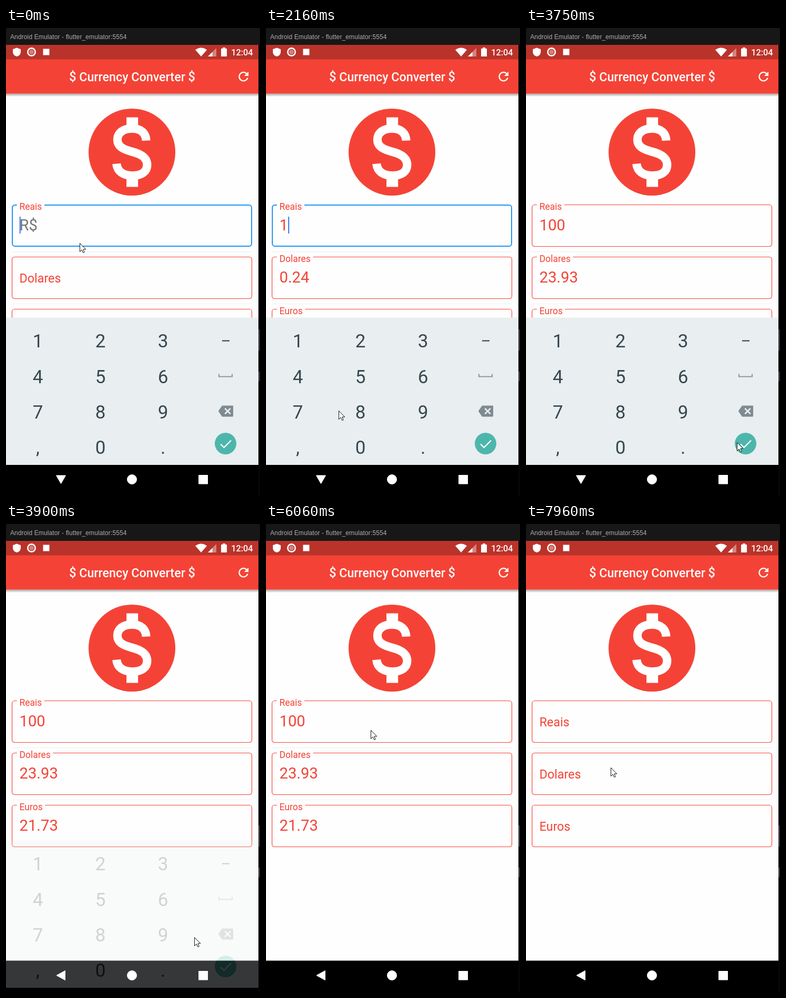
An HTML page for the animation above (8000 ms loop, 483 by 888 pixels).

```html
<!DOCTYPE html>
<html lang="en">
<head>
<meta charset="utf-8">
<title>Currency Converter</title>
<style>
html, body { margin: 0; width: 100%; height: 100%; overflow: hidden; background: #000; }
svg { display: block; width: 483px; height: 888px; font-family: Roboto, sans-serif; }
.window { font: 12px 'Liberation Sans', Arial, sans-serif; letter-spacing: .12px; fill: #b0b0b0; }
.value { font-size: 29.2px; fill: #f44336; }
.label { font-size: 23.3px; fill: #f44336; }
.key { font-size: 35px; fill: #37474f; text-anchor: middle; }
.line { fill: none; stroke-width: 2.2; }
</style>
</head>
<body>
<svg viewBox="0 0 483 888">
  <defs>
    <linearGradient id="shade" x1="0" y1="0" x2="0" y2="1">
      <stop offset="0" stop-opacity=".35"/>
      <stop offset="1" stop-opacity="0"/>
    </linearGradient>
  </defs>
  <rect width="483" height="888" fill="#05070a"/>
  <path d="M480 572h3v40h-3zM480 652h3v18h-3z" fill="#35383d"/>
  <rect width="483" height="32" fill="#171717"/>
  <text class="window" x="8" y="21">Android Emulator - flutter_emulator:5554</text>

  <rect y="59" width="480" height="770" fill="#fefefe"/>
  <rect y="124.5" width="480" height="6" fill="url(#shade)"/>
  <rect y="32" width="480" height="28" fill="#b9332a"/>
  <rect y="59.5" width="480" height="65" fill="#f44336"/>

  <g fill="#fff">
    <path d="M20.5 37.5L28 40.3V45.5Q28 52 20.5 54Q13 52 13 45.5V40.3z"/>
    <circle cx="48.5" cy="45.5" r="8.5"/>
    <circle cx="48.5" cy="45.5" r="5.2" fill="#d98078" stroke="#b9332a" stroke-width="1.3"/>
    <rect x="70.5" y="39.5" width="12" height="12"/>
    <path d="M371 54L360 41.5Q371 33.5 382 41.5z"/>
    <path d="M384 54L400 38V54z" opacity=".4"/>
    <path d="M384 54L392.5 45.5V54z"/>
    <path d="M412 37h5v2h3v15h-11v-15h3z"/>
    <text x="428.3" y="52" font-size="16.3" font-weight="500">12:04</text>
    <text x="240" y="101" font-size="23.3" font-weight="500" text-anchor="middle">$ Currency Converter $</text>
    <g transform="translate(437.7 78.2) scale(1.167)">
      <path d="M18.7 14A7 7 0 1 1 17 7.1" fill="none" stroke="#fff" stroke-width="2"/>
      <path d="M13 11h7V4z"/>
    </g>
  </g>

  <g transform="translate(239.5 235.5) scale(8.25) translate(-12 -12)">
    <circle cx="12" cy="12" r="10" fill="#f44336"/>
    <path d="M10.74 4h2.67v2.5h-2.67zM10.74 17.5h2.67v2.5h-2.67z" fill="#fff"/>
    <path d="M15.28 9.34C15.2 7.7 14.2 6.57 12.08 6.57S8.65 7.6 8.65 9.12S9.8 11.35 12.08 11.92S15.5 13.4 15.5 14.94S14.2 17.4 12.08 17.4S8.6 16.4 8.45 14.67"
      fill="none" stroke="#fff" stroke-width="1.95"/>
  </g>

  <path d="M12 424.5H468M12 523.5H468" stroke="#eee"/>
  <g id="form"></g>
  <rect id="caret" y="358" width="2.2" height="32" fill="#4285f4"/>
  <rect y="828.5" width="480" height="59.5"/>

  <g id="keyboard">
    <rect y="549.5" width="480" height="279.500" fill="#e9eef0"/>
    <rect id="press" x="120.5" y="761" width="118.5" height="67.5" fill="#d8dddf"/>
    <g id="keys"></g>
    <path class="line" d="M411 593.5H425" stroke="#37474f"/>
    <path class="line" d="M405 656.500V661.500H430V656.500" stroke="#8d989d"/>
    <g transform="translate(404 713) scale(1.167)">
      <path d="M1 12L6.500 4H23V20H6.500z" fill="#7f8b90" stroke="#7f8b90" stroke-width="2" stroke-linejoin="round"/>
      <path class="line" d="M10.500 7.500l9 9m0-9l-9 9" stroke="#e9eef0"/>
    </g>
    <circle cx="417.5" cy="788.5" r="20.5" fill="#4db6ac"/>
    <path class="line" d="M408 789.5L414.5 796L428 782.5" stroke="#fff"/>
  </g>

  <g fill="#fff" stroke="#fff" stroke-linejoin="round">
    <path id="back"/>
    <circle cx="239.5" cy="856.5" r="9"/>
    <rect x="366.5" y="848.5" width="17" height="16.5"/>
  </g>
  <path id="mouse" d="M.5 .5V16.5L4.2 13L6.8 18.5L9.2 17.5L6.8 12H11.8z" fill="#fff" stroke="#111"/>
</svg>
<script>
const LOOP = 8000, STEP = 135;
const BLUR = 3600, CLOSE = 3657, RESET = 7220;
const $ = id => document.getElementById(id);
const clamp = v => Math.min(1, Math.max(0, v));
const mix = (a, b, p) => a + (b - a) * p;
const smooth = p => p * p * (3 - 2 * p);

function set(el, attrs) {
  for (const k in attrs) el.setAttribute(k, attrs[k]);
  return el;
}

function add(parent, tag, attrs, text = '') {
  const el = set(document.createElementNS('http://www.w3.org/2000/svg', tag), attrs);
  el.textContent = text;
  return parent.appendChild(el);
}

// Where the pointer rests or turns: time, x, y
const stops = [
  [0, 140, 408], [700, 301, 664], [1485, 183, 595], [1755, 56, 600],
  [2430, 182, 794], [2970, 182, 794], [3510, 416, 787], [3915, 358, 784],
  [4600, 26, 500], [5130, 65, 493], [5670, 14, 589], [6480, 383, 192],
  [7020, 449, 95], [7300, 454, 88], [7965, 161, 462]
];

const typed = [[1740, '1'], [2560, '10'], [2960, '100']];

// Each field: name and price of one unit in reais
const fields = [['Reais', 1], ['Dolares', 4.179], ['Euros', 4.602]].map(([name, price], i) => {
  const y = 335.5 + 99 * i;
  return {
    y, price, main: i === 0,
    border: add($('form'), 'path', { fill: 'none' }),
    label: add($('form'), 'text', { class: 'label' }, name),
    value: add($('form'), 'text', { class: 'value', x: 25.5, y: y + 48.7 })
  };
});

['123', '456', '789', ',0.'].forEach((row, r) =>
  [...row].forEach((ch, c) =>
    add($('keys'), 'text', { class: 'key', x: 60.5 + 119 * c, y: 606.2 + 67.4 * r }, ch)));

function pointer(t) {
  const i = Math.max(1, stops.findIndex(s => s[0] >= t));
  const [t0, x0, y0] = stops[i - 1], [t1, x1, y1] = stops[i];
  const p = smooth((t - t0) / (t1 - t0));
  return [mix(x0, x1, p), mix(y0, y1, p)].map(Math.round);
}

// Rounded box with an opening for the label, drawn clockwise
function outline(top, gap, inset) {
  const l = 11.5 + inset, r = 467.5 - inset, t = top + inset, b = top + 79 - inset, c = 4.7;
  const arc = `a${c} ${c} 0 0 1 `;
  return `M${20.8 + gap} ${t}H${r - c}${arc}${c} ${c}V${b - c}${arc}${-c} ${c}` +
    `H${l + c}${arc}${-c} ${-c}V${t + c}${arc}${c} ${-c}H20.8`;
}

function drawField(f, t, input) {
  const focus = f.main && t < BLUR;
  const rise = f.main ? 1 : clamp((t - typed[0][0]) / 200);
  const up = rise * (1 - clamp((t - RESET) / 200));
  const gap = (f.label.getComputedTextLength() * .75 + 9.4) * up;
  set(f.label, { transform: `translate(25.5 ${f.y + mix(48.5, 9.5, up)}) scale(${mix(1, .75, up)})` });
  set(f.border, {
    d: outline(f.y, gap, focus ? .5 : 0),
    stroke: focus ? '#2196f3' : '#f44336',
    'stroke-width': focus ? 2 : 1.17
  });
  const hint = focus ? 'R$' : '';
  f.value.textContent = !input ? hint : f.main ? input : (input / f.price).toFixed(2);
  f.value.style.fill = input ? '' : '#757575';
}

function draw(time) {
  const t = Math.floor(time / STEP + .2) * STEP;
  const [since, text] = typed.findLast(k => k[0] <= t) || [-50, ''];
  const input = t < RESET ? text : '';
  fields.forEach(f => drawField(f, t, input));

  const lit = t < BLUR && (t - since) % 1000 < 500;
  set($('caret'), {
    visibility: lit ? 'visible' : 'hidden',
    x: 25.6 + (input ? fields[0].value.getComputedTextLength() : 0)
  });

  const u = Math.max(0, (t - CLOSE) / 258);
  set($('keyboard'), {
    opacity: u < 1.3 ? 1 - .77 * u ** 1.2 : 0,
    transform: `translate(0 ${51 * u * u})`
  });
  set($('press'), { visibility: t > 2830 && t < 2960 ? 'visible' : 'hidden' });
  set($('back'), { d: u ? 'M96 856.5l16.5-9v18z' : 'M95.5 849h18l-9 15.5z' });
  set($('mouse'), { transform: `translate(${pointer(t)})` });
}

function tick(now) {
  draw(now % LOOP);
  requestAnimationFrame(tick);
}
requestAnimationFrame(tick);
</script>
</body>
</html>
```
